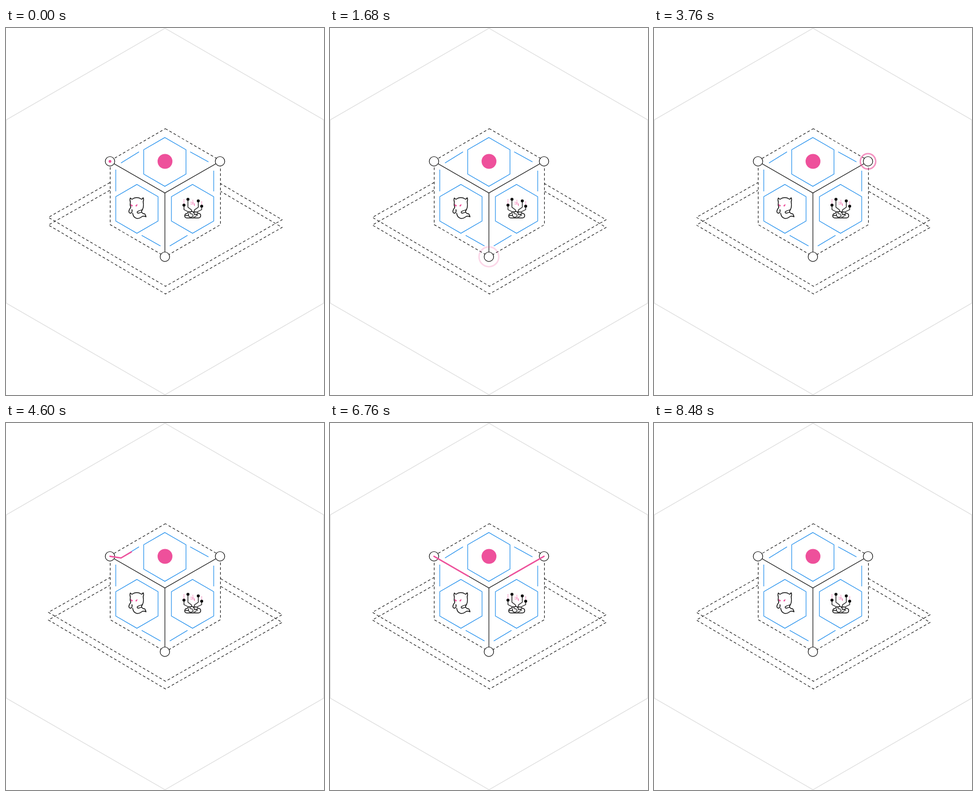
An HTML page with a canvas for the animation above (8.52 s loop, 600 px wide and 692 px high).

```html
<!DOCTYPE html>
<html lang="en">
<head>
<meta charset="utf-8">
<title>Cube network</title>
<style>
html, body { margin: 0; width: 100%; height: 100%; overflow: hidden; background: #fff; }
canvas { display: block; width: 600px; height: 692px; }
</style>
</head>
<body>
<canvas id="stage"></canvas>
<script>
const LOOP = 8520, STEP = 40;
const PINK = '#ee509b', BLUE = '#1187ec', INK = '#111';
const DASH = [5, 4], MARCHES = 20;
const canvas = document.getElementById('stage');
const ratio = window.devicePixelRatio || 1;
canvas.width = 600 * ratio;
canvas.height = 692 * ratio;
const ctx = canvas.getContext('2d');
ctx.scale(ratio, ratio);

const hexagon = (x, y, w, h) =>
  [[x, y - h], [x + w, y - h / 2], [x + w, y + h / 2], [x, y + h], [x - w, y + h / 2], [x - w, y - h / 2]];

const left = [196.2, 251.4], right = [403.8, 251.4], bottom = [299.8, 431.4], center = [299.8, 311];
const topHex = hexagon(299.7, 252.5, 39.9, 46.1);
const leftHex = hexagon(247, 341, 39.9, 46.1);
const rightHex = hexagon(352, 341, 39.9, 46.1);
const cube = hexagon(300.6, 310.5, 104, 120.7);

const links = [
  [[217, 254.5], [251, 233.5]], [[347.5, 233.5], [382, 252.5]],
  [[207.1, 267], [207.1, 308]], [[391.9, 269], [391.9, 308]],
  [[256, 391], [291.5, 411]], [[309, 411], [342.5, 391]]
];

const platform = [0, 14.5].map(dy =>
  [[196, 291.5 + dy], [80, 357 + dy], [301, 487 + dy], [521, 361.5 + dy], [405, 293.5 + dy]]);

// Corners of a hexagon, walked from one index for a number of steps
const walk = (hex, from, steps, dir) =>
  Array.from({ length: steps + 1 }, (_, i) => hex[(from + i * dir + 12) % 6]);

const traces = [
  { start: 0, span: 1160, lag: 400, path: [left, [207.1, 267], ...walk(leftHex, 5, 8, -1), [291.5, 411], bottom] },
  { start: 1849, span: 1483, lag: 408, path: [bottom, [309, 411], ...walk(rightHex, 3, 8, -1), [391.9, 269], right] },
  { start: 4407, span: 1483, lag: 482, path: [left, [217, 254.5], ...walk(topHex, 5, 8, 1), [382, 252.5], right] },
  { start: 6490, span: 770, lag: 650, path: [left, center, bottom] },
  { start: 6490, span: 770, lag: 650, path: [right, center, bottom] }
];

const pulses = [[-35, left], [1130, bottom], [3332, right], [5880, right], [7225, bottom]];
const PULSE = 620;

function line(points, color, width, close) {
  ctx.beginPath();
  points.forEach(p => ctx.lineTo(p[0], p[1]));
  if (close) ctx.closePath();
  ctx.strokeStyle = color;
  ctx.lineWidth = width;
  ctx.stroke();
}

function circle(x, y, r, fill, stroke, width) {
  ctx.beginPath();
  ctx.arc(x, y, r, 0, Math.PI * 2);
  if (fill) { ctx.fillStyle = fill; ctx.fill(); }
  if (stroke) { ctx.strokeStyle = stroke; ctx.lineWidth = width; ctx.stroke(); }
}

function shape(d, color, width, fill) {
  const p = new Path2D(d);
  if (fill) { ctx.fillStyle = fill; ctx.fill(p); }
  if (color) { ctx.strokeStyle = color; ctx.lineWidth = width; ctx.stroke(p); }
}

function ease(u) {
  u = Math.min(1, Math.max(0, u));
  return u / 2 + (1 - Math.cos(Math.PI * u)) / 4;
}

function slice(path, a, b) {
  const out = [];
  let pos = 0;
  for (let i = 1; i < path.length; i++) {
    const [p, q] = [path[i - 1], path[i]];
    const len = Math.hypot(q[0] - p[0], q[1] - p[1]);
    const s = Math.max(a, pos), e = Math.min(b, pos + len);
    if (e > s) {
      const at = d => [p[0] + (q[0] - p[0]) * (d - pos) / len, p[1] + (q[1] - p[1]) * (d - pos) / len];
      if (!out.length) out.push(at(s));
      out.push(at(e));
    }
    pos += len;
  }
  return out;
}

const length = path => path.slice(1).reduce((sum, q, i) => sum + Math.hypot(q[0] - path[i][0], q[1] - path[i][1]), 0);
traces.forEach(tr => { tr.len = length(tr.path); });

function drawGhost() {
  // Head, back and tail
  shape('M234.6 328 Q233.2 323.5 234.6 320.5 L237.6 323 Q246.8 316.6 256 323 L258.8 320 Q260.4 324 258.7 327.5 ' +
    'Q260.6 336 257.6 342 Q255 345.5 256.2 348 Q258.5 350.4 262 350.6 Q263.4 352.8 264.2 356 ' +
    'Q259.5 353.6 256 356 Q251.5 359.8 246.5 359 Q240 357.5 239 349.2', INK, 1.5);
  // Arms
  shape('M234.6 328 Q233.6 334 235.4 338.5 Q231.6 343 231.9 347 Q233.5 350.2 236.6 348.6 Q238.6 346 237.6 342.5', INK, 1.5);
  shape('M257.6 342.6 Q252.5 343.5 248 346.2 Q246.6 348.4 249 349.2 Q253 348.6 256 347', INK, 1.4);
  shape('M235 331.8 L239.3 334.5 Q238.8 337 236.5 336.2 Q234.8 335 235 331.8 Z', null, 0, PINK);
  shape('M248 331.8 L244.3 334.5 Q244 337 246.2 336.4 Q248.2 335 248 331.8 Z', null, 0, PINK);
}

function drawBrain() {
  line([[343.3, 323], [343.3, 338], [350, 343], [350, 346]], INK, 1.3);
  line([[335.8, 334], [335.8, 342.5], [344, 346.5]], INK, 1.3);
  line([[362.8, 326], [362.8, 338], [355.5, 343], [355.5, 346]], INK, 1.3);
  line([[369.2, 336], [369.2, 342.5], [361, 346.5]], INK, 1.3);
  [[343.3, 323], [335.8, 334], [362.8, 326], [369.2, 336]].forEach(([x, y]) => circle(x, y, 2.8, '#000'));
  shape('M341.5 358.2 Q337 358 337.2 353.7 Q337.6 349.6 342 349.4 Q344 345.5 348 346.8 Q352 344.5 355 347.2 ' +
    'Q360 345.6 362.5 349.2 Q367.2 349.4 367.4 353.8 Q367.2 358.2 362.5 358.2 Z', INK, 1.5);
  shape('M338 353.5 H343.5 M344.5 350 Q343.5 357 349 356.8 Q354 356 352.4 351.5 M347 347.5 Q347 351 351 350.5 ' +
    'M353 348 Q356 348.5 355.5 352 Q360 350 361.5 353.5 M354 356.4 Q358.5 356.8 359.2 353 M362 350 L359.5 351.5', INK, 1.3);
  ctx.setLineDash([1.5, 1.8]);
  line([[335.8, 323.5], [335.8, 331]], PINK, 0.9);
  line([[369.2, 327.5], [369.2, 333]], PINK, 0.9);
  line([[349.5, 328], [349.5, 334]], PINK, 0.9);
  ctx.setLineDash([]);
  line([[352.6, 327.5], [352.6, 332.5]], PINK, 1.1);
  line([[355.4, 331], [355.4, 335]], PINK, 1.1);
  circle(352.6, 325, 0.7, PINK);
}

function draw(t) {
  ctx.fillStyle = '#fff';
  ctx.fillRect(0, 0, 600, 692);
  ctx.lineCap = 'butt';
  ctx.lineJoin = 'miter';
  line(hexagon(300, 346, 299.5, 345.5), '#dcdcdc', 1.2, true);

  ctx.setLineDash(DASH);
  ctx.lineDashOffset = -t / LOOP * MARCHES * (DASH[0] + DASH[1]);
  platform.forEach(p => line(p, INK, 1.1));
  line(cube, INK, 1.1, true);
  ctx.setLineDash([]);
  ctx.lineDashOffset = 0;

  [topHex, leftHex, rightHex].forEach(h => line(h, BLUE, 1.1, true));
  links.forEach(l => line(l, BLUE, 1.1));
  line([left, center, right], INK, 1.2);
  line([center, bottom], INK, 1.2);
  [left, right, bottom].forEach(([x, y]) => circle(x, y, 8.9, '#fff', INK, 1.2));

  ctx.lineCap = ctx.lineJoin = 'round';
  circle(300, 251.5, 14, PINK);
  drawGhost();
  drawBrain();

  for (const { start, span, lag, path, len } of traces) {
    const head = ease((t - start) / span) * len;
    const tail = ease((t - start - lag) / span) * len;
    if (head > tail) line(slice(path, tail, head), PINK, 2.6);
  }

  for (const [start, [x, y]] of pulses) {
    const u = (t - start) / PULSE;
    if (u <= 0 || u >= 1) continue;
    ctx.globalAlpha = Math.min(1, 2 * (1 - u));
    circle(x, y, 21 * u, null, PINK, 2.8);
    ctx.globalAlpha = 1;
  }
}

const origin = performance.now();
function tick() {
  const t = (performance.now() - origin) % LOOP;
  draw(Math.floor(t / STEP) * STEP);
  requestAnimationFrame(tick);
}
tick();
</script>
</body>
</html>
```
